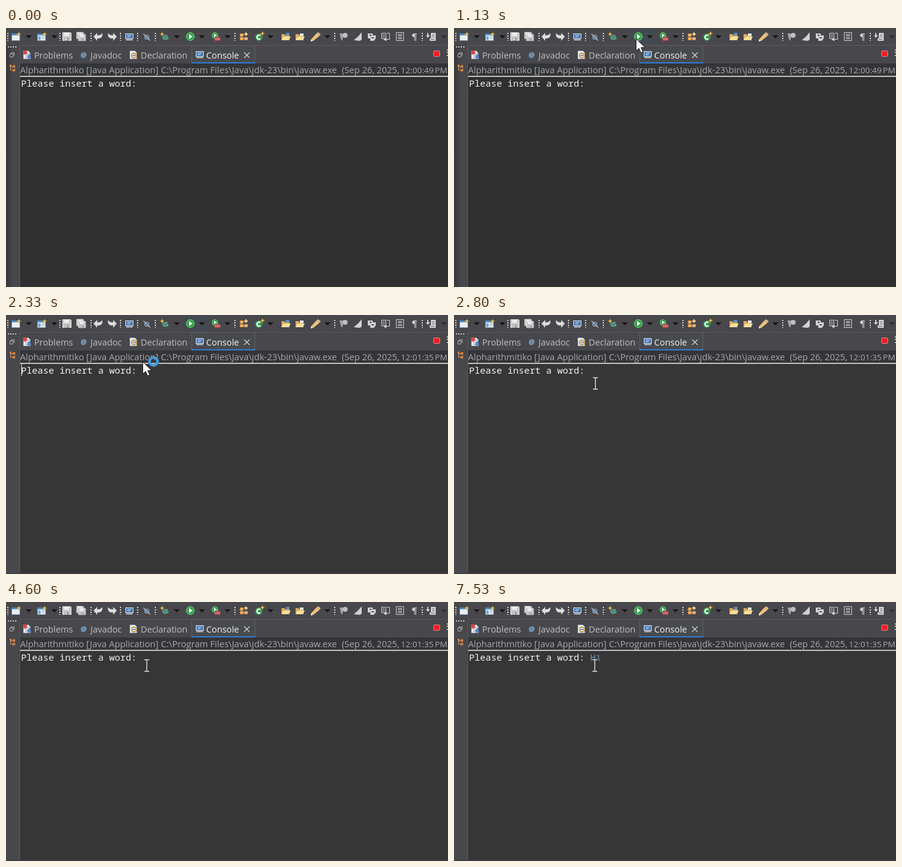
These frames come from a looping animation (722 by 424 pixels, 8000 ms). An HTML page:

```html
<!DOCTYPE html>
<html lang="en">
<head>
<meta charset="utf-8">
<title>Console input</title>
<style>
html, body { margin: 0; width: 100%; height: 100%; overflow: hidden; background: #48484c; }
svg { display: block; width: 722px; height: 424px; }
text { white-space: pre; }
.ui { font: 14.3px "Open Sans", "Noto Sans", sans-serif; }
.tabs { fill: #c0c0c2; }
.head { font-size: 14.55px; fill: #a9a9ab; }
.time { font-size: 13.5px; }
.mono { font: 15px "Noto Sans Mono", "DejaVu Sans Mono", monospace; fill: #f2f2f2; }
.typed { fill: #6796bd; }
#i { font-family: "DejaVu Sans Mono", monospace; }

/* Every track is stepped on the same 8 s clock: 1% = 80 ms. */
.a { animation: 8s step-end -4ms infinite; }
.hide { visibility: hidden; }
#pane { animation-name: pane; }
#shade { animation-name: shade; }
#edge { animation-name: late; }
#old { animation-name: old; }
#new { animation-name: fresh; }
#prompt { animation-name: prompt; }
#hover { animation-name: hover; }
#caret { animation-name: caret; }
#h { animation-name: typeH; }
#i { animation-name: typeI; }
#arrow { animation-name: arrow; }
#ring { animation-name: ring; }
#beam { animation-name: beam; }

@keyframes pane { 0% { fill: #2f2f2f } 18.375%, to { fill: #363636 } }
@keyframes shade { 0% { visibility: visible } 18.375%, to { visibility: hidden } }
@keyframes late { 0% { visibility: hidden } 18.375%, to { visibility: visible } }
@keyframes old { 0% { visibility: visible } 20.875%, to { visibility: hidden } }
@keyframes fresh { 0% { visibility: hidden } 20.875%, to { visibility: visible } }
@keyframes prompt { 0% { visibility: visible } 20.875% { visibility: hidden } 22.5%, to { visibility: visible } }
@keyframes hover { 0% { visibility: hidden } 12.5% { visibility: visible } 30%, to { visibility: hidden } }
@keyframes typeH { 0% { visibility: hidden } 67.5%, to { visibility: visible } }
@keyframes typeI { 0% { visibility: hidden } 74.125%, to { visibility: visible } }
@keyframes caret {
  0% { visibility: hidden; transform: translateX(25px) }
  23.375% { visibility: visible; transform: translateX(25px) }
  30% { visibility: hidden; transform: translateX(25px) }
  36.625% { visibility: visible; transform: translateX(25px) }
  37.5% { visibility: visible; transform: translateX(223px) }
  44.125% { visibility: hidden; transform: translateX(223px) }
  50.875% { visibility: visible; transform: translateX(223px) }
  57.5% { visibility: hidden; transform: translateX(223px) }
  64.125% { visibility: visible; transform: translateX(223px) }
  67.5% { visibility: visible; transform: translateX(232px) }
  74.125% { visibility: visible; transform: translateX(241px) }
  80.875% { visibility: hidden; transform: translateX(241px) }
  86.625% { visibility: visible; transform: translateX(241px) }
  94.125%, to { visibility: hidden; transform: translateX(241px) }
}
@keyframes arrow {
  0% { visibility: hidden; transform: translate(360px, 72px) }
  10.875% { visibility: visible; transform: translate(350px, 70px) }
  11.625% { transform: translate(325px, 46px) }
  12.5% { transform: translate(309px, 29px) }
  13.375% { transform: translate(301px, 21px) }
  14.125% { transform: translate(297px, 17px) }
  15% { transform: translate(300px, 16px) }
  15.875% { transform: translate(297px, 17px) }
  27.5% { transform: translate(281px, 29px) }
  28.375% { transform: translate(247px, 57px) }
  29.125% { visibility: visible; transform: translate(223px, 76px) }
  30%, to { visibility: hidden; transform: translate(223px, 76px) }
}
@keyframes ring { 0% { opacity: 0 } 18.375%, to { opacity: 1 } }
@keyframes beam {
  0% { visibility: hidden; transform: translate(704px, 416px) }
  4.125% { visibility: visible; transform: translate(704px, 413px) }
  5% { transform: translate(678px, 383px) }
  5.875% { transform: translate(634px, 336px) }
  6.625% { transform: translate(580px, 280px) }
  7.5% { transform: translate(522px, 223px) }
  8.375% { transform: translate(465px, 169px) }
  9.125% { transform: translate(420px, 128px) }
  10% { visibility: visible; transform: translate(382px, 96px) }
  10.875% { visibility: hidden; transform: translate(226px, 88px) }
  30% { visibility: visible; transform: translate(226px, 89px) }
  30.875% { transform: translate(228px, 92px) }
  31.625% { transform: translate(230px, 94px) }
  34.125% { transform: translate(230px, 100px) }
  35% { transform: translate(231px, 112px) }
  35.875% { transform: translate(231px, 117px) }
  36.625% { transform: translate(230px, 109px) }
  37.5% { visibility: visible; transform: translate(230px, 104px) }
  67.5% { visibility: hidden; transform: translate(230px, 104px) }
  71.625% { visibility: visible; transform: translate(230px, 104px) }
  74.125% { visibility: hidden; transform: translate(230px, 104px) }
  84.125%, to { visibility: visible; transform: translate(230px, 104px) }
}
</style>
</head>
<body>
<svg viewBox="0 0 722 424">
  <defs>
    <linearGradient id="fade">
      <stop stop-color="#2c2c2e" stop-opacity=".55"/>
      <stop offset="1" stop-color="#2c2c2e" stop-opacity="0"/>
    </linearGradient>
    <path id="tri" d="M-5 12h10l-5 5z" fill="#161618"/>
    <path id="grip" d="M0 8v13" stroke="#d4d4d4" stroke-width="2" stroke-dasharray="2 2"/>
    <g id="window">
      <rect x=".5" y="9.5" width="13" height="11" fill="#e8eef4" stroke="#8a9bb0"/>
      <path d="M0 9h14v3H0z" fill="#4a8ccb"/>
    </g>
    <path id="star" d="M0-4 1-1 4 0 1 1 0 4-1 1-4 0-1-1z" fill="#f3c34c"/>
    <g id="floppy">
      <path d="M.5 7.5h13l1 1v12H.5z" fill="#c9c9cb" stroke="#dedede"/>
      <path d="M3 8h8v5H3z" fill="#ececec"/>
      <path d="M4 16h7v5H4z" fill="#a2a2a5"/>
      <path d="M5 17h2v3H5z" fill="#ececec"/>
    </g>
    <path id="back" d="M0 14l6-6v4c4 0 7-1 8-4 2 6-2 10-8 9v4z" fill="#dcdcdc"/>
    <g id="screen">
      <path d="M0 0h13v9H0z" fill="#e6eef9"/>
      <path d="M1 1h11v7H1z" fill="#3f70ad"/>
      <path d="M3 3h7M3 5.5h5" stroke="#e6eef9"/>
      <path d="M1 10.500h11" stroke="#d3e0f0" stroke-width="1.500"/>
    </g>
    <g id="play">
      <circle cx="7" cy="7" r="7" fill="#2f9e46"/>
      <circle cx="7" cy="7" r="6.3" fill="none" stroke="#82cf8c"/>
      <path d="M5 3l6 4-6 4z" fill="#fff"/>
    </g>
    <g id="folder">
      <path d="M0 10h5l1 2h7v8H0z" fill="#d9ab5c"/>
      <path d="M3 14h12l-3 6H0z" fill="#f8dfa0"/>
    </g>
    <g id="page">
      <path d="M.5.5h8l3 3v10H.5z" fill="#f1f3f6" stroke="#9aa7b8"/>
      <path d="M3 5h6M3 8h6M3 11h5" stroke="#6c8fbd"/>
    </g>
  </defs>

  <!-- Panels -->
  <path d="M0 0h722v424H0z" fill="#48484c"/>
  <path id="shade" class="a" d="M0 28h12v396H0z" fill="url(#fade)"/>
  <path d="M22.5 424V28.5H722" fill="none" stroke="#58585b"/>
  <path d="M303.500 58V28.500h103V58" fill="#484a4e" stroke="#606064"/>
  <path d="M23 58h699v21H23z" fill="#343537"/>
  <path d="M303 56h104v2H303z" fill="#2f7cd3"/>
  <path id="pane" class="a" d="M23 80h699v344H23z" fill="#2f2f2f"/>
  <path d="M23 78.5h699V80H23z" fill="#ededed"/>
  <path id="edge" class="a hide" d="M0 422h722v2H0z" fill="#403c3d"/>
  <path id="hover" class="a hide" d="M289 3h40v22h-40z" fill="#434950"/>

  <!-- Toolbar -->
  <use href="#grip" x="3"/><use href="#grip" x="88"/><use href="#grip" x="139"/>
  <use href="#grip" x="187"/><use href="#grip" x="215"/><use href="#grip" x="244"/>
  <use href="#grip" x="374"/><use href="#grip" x="537"/><use href="#grip" x="680"/>
  <use href="#tri" x="37"/><use href="#tri" x="79"/><use href="#tri" x="279"/>
  <use href="#tri" x="320"/><use href="#tri" x="362"/><use href="#tri" x="432"/>
  <use href="#tri" x="525"/><use href="#tri" x="715" opacity=".5"/>
  <use href="#window" x="9"/><use href="#star" x="21" y="10"/>
  <use href="#window" x="51"/><use href="#star" x="63" y="10"/>
  <path d="M53 14h3v5h-3zM58 14h5M58 17h5" fill="#77a7d8" stroke="#77a7d8"/>
  <use href="#floppy" x="92"/>
  <use href="#floppy" transform="translate(115 1) scale(.8)"/>
  <use href="#floppy" transform="translate(118 4) scale(.82)"/>
  <use href="#back" x="143"/><use href="#back" transform="matrix(-1 0 0 1 181 0)"/>
  <use href="#screen" x="195" y="9"/>
  <g fill="none" stroke-width="1.2">
    <circle cx="230" cy="15" r="3.500" fill="#56728e" stroke="#86a3be"/>
    <path d="M224.500 9.500l11 11" stroke="#b4c0cc"/>
  </g>
  <g stroke="#78b9a6">
    <path d="M255 12.500l10 6M264 11l-8 8M255 16h11"/>
    <ellipse cx="260.500" cy="15.500" rx="3" ry="3.500" fill="#3d8d72"/>
  </g>
  <use href="#star" x="255" y="10"/>
  <use href="#play" x="294" y="7"/>
  <use href="#play" transform="translate(336 7) scale(.75)"/>
  <path d="M341 15h9v6h-9z" fill="#c8464a"/><path d="M341 18h9M345 13v2" stroke="#f0b0a8"/>
  <path d="M382 9h6v5h-6zM382 15h6v5h-6zM389 15h6v5h-6z" fill="#d5914b"/>
  <path d="M385 9v11M382 11.500h6M382 17.500h13M392 15v5" stroke="#efc189"/>
  <path d="M392 7v6M389 10h6" stroke="#f5d27d" stroke-width="2"/>
  <circle cx="413" cy="15" r="6" fill="#3b9850"/>
  <path d="M415.500 12.500a3.300 3.300 0 1 0 0 5" fill="none" stroke="#fff" stroke-width="2"/>
  <use href="#star" x="419" y="9"/>
  <use href="#folder" x="450"/><path d="M457 8h6v4h-6z" fill="#568fc9"/>
  <use href="#folder" x="473"/><path d="M480 9h6v4h-6z" fill="#e7ebf0"/>
  <path d="M498 19l9-10 5 4-10 8z" fill="#edc37c"/>
  <path d="M507 9l3-2 4 3-2 3z" fill="#e0b58f"/><path d="M498 19l4 2-4 1z" fill="#fff"/>
  <g fill="#d2d2d2">
    <path d="M545 9h8l-2 5-2 7-2-3z" fill="#a6a6a8"/><circle cx="554" cy="12" r="4" fill="#bdbdbf"/>
    <path d="M568 20l7-6 6-7v12l-3 2z"/>
    <path d="M591 9h8v3h5v5l-3 4h-6v-4h-4z"/>
    <path d="M594 12h3M597 16h4" stroke="#55555a" stroke-width="2"/>
    <path d="M667 9h4v1h-1v11h-1V10h-1v11h-1v-6c-5 0-5-6 0-6z"/>
    <path d="M688 8h2v4h3l-4 4-3-4h2z"/>
    <path d="M694 8h8v13h-10v-4h2z"/>
  </g>
  <path d="M696 11.500h4M696 14.500h4M694 18.500h6" stroke="#66666a"/>
  <g fill="none" stroke="#d2d2d2">
    <path d="M613.500 8.500h7v9h-7zM615 11.500h4M615 14.500h4M622 8.500h4.500v10H618"/>
    <path d="M621 16v5l-4-2.500z" fill="#d2d2d2"/>
    <path d="M637.500 7.500h12v13h-12z"/>
    <path d="M640 10.500h7M640 12.500h7M640 15.500h7M640 17.500h7"/>
  </g>

  <!-- Side strip -->
  <path d="M3 31h15" stroke="#c8c8c8" stroke-width="2" stroke-dasharray="2 2"/>
  <path d="M8.500 42V40.500h5v4H12M6.500 42.500h5v5h-5z" fill="none" stroke="#b4b4b6"/>
  <path d="M7.500 60v9H11M7.500 63.500H11" fill="none" stroke="#c8a078"/>
  <path d="M6 60h3v3H6zM11 61h4v4h-4zM11 67h4v4h-4z" fill="#d97f35"/>

  <!-- Tabs -->
  <use href="#page" x="28" y="37"/>
  <circle cx="31" cy="40" r="3.500" fill="#d8484b"/><path d="M35 46l4-5 2 9h-6z" fill="#5d87bd"/>
  <text x="122" y="48" font-family="Open Sans, sans-serif" font-size="11" font-weight="700" fill="#8cc3f2">@</text>
  <use href="#page" x="202" y="37"/>
  <circle cx="209" cy="45" r="4" fill="none" stroke="#cf9e3b" stroke-width="2"/><path d="M207 45h5" stroke="#315f99"/>
  <use href="#screen" x="310" y="38"/>
  <g class="ui tabs">
    <text x="46" y="49.500">Problems</text>
    <text x="138" y="49.500">Javadoc</text>
    <text x="220" y="49.500">Declaration</text>
    <text x="327" y="49.500" fill="#f4f4f4">Console</text>
  </g>
  <path d="M389 40l9 9M398 40l-9 9" stroke="#d2d2d2" stroke-width="1.200"/>
  <rect x="698.500" y="37.500" width="10" height="9" rx="1" fill="#f21d26" stroke="#e0898b"/>
  <path d="M720 36h2M720 40h2M720 45h2" stroke="#b8b8ba" stroke-width="2"/>

  <!-- Launch line -->
  <g class="ui head">
    <text x="23" y="74">Alpharithmitiko</text>
    <text x="131" y="74">[Java Application]</text>
    <text x="253" y="74">C:\Program Files\Java\jdk-23\bin\javaw.exe</text>
    <text x="548.500" y="74">(Sep 26, 2025,</text>
    <g class="time">
      <text id="old" class="a" x="645" y="74">12:00:49</text>
      <text id="new" class="a hide" x="645" y="74">12:01:35</text>
      <text x="700.500" y="74">PM</text>
    </g>
  </g>

  <!-- Console -->
  <g class="mono">
    <text id="prompt" class="a" x="24.500" y="96">Please insert a word:</text>
    <text id="h" class="a hide typed" x="222.500" y="96">H</text>
    <text id="i" class="a hide typed" x="231.500" y="96">ι</text>
  </g>
  <path id="caret" class="a hide" d="M0 80h1v20H0z" fill="#e4e4e4"/>

  <!-- Pointers -->
  <g id="beam" class="a hide" fill="none">
    <path d="M-4-9.500h3l1 1 1-1h3M0-8.500v17M-4 9.500h3l1-1 1 1h3" stroke="#222" stroke-width="2.400"/>
    <path d="M-4-9.500h3l1 1 1-1h3M0-8.500v17M-4 9.500h3l1-1 1 1h3" stroke="#ececec" stroke-width="1.400"/>
  </g>
  <g id="arrow" class="a hide">
    <path d="M.5.5v20l4.600-4.300 3.200 7.300 3.400-1.500-3.200-7.100h6.300z" fill="#fff" stroke="#1c1c1c"/>
    <g id="ring" class="a" fill="none">
      <circle cx="18" r="6.500" stroke="#2f74ad" stroke-width="5"/>
      <circle cx="18" r="6.500" stroke="#4c9bd9" stroke-width="3.500"/>
    </g>
  </g>
</svg>
</body>
</html>
```
